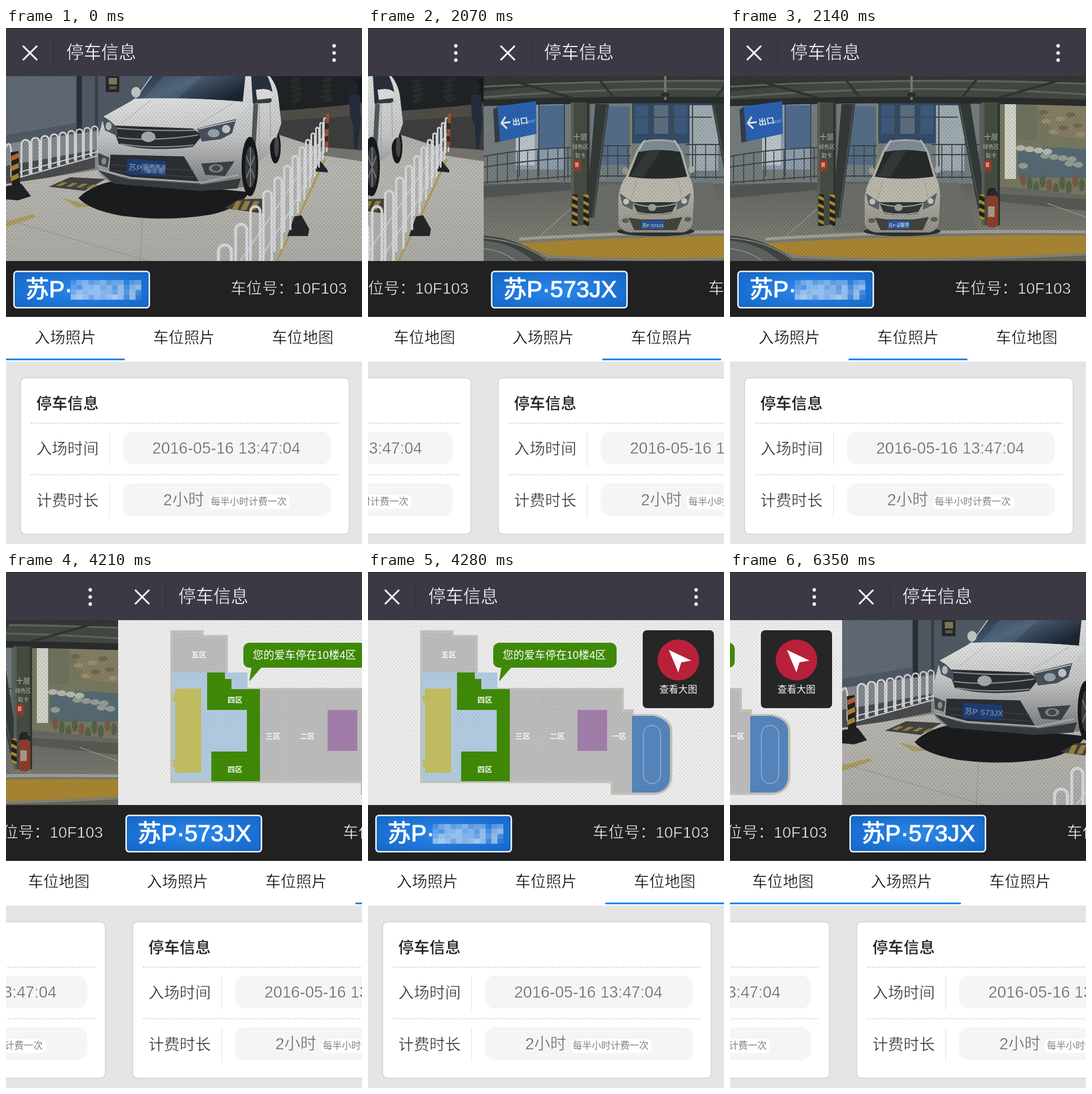
Write an HTML page that moves like this. It is 600x868 px and loops after 6.42 s.

```html
<!DOCTYPE html>
<html lang="zh-CN">
<head>
<meta charset="utf-8">
<title>停车信息</title>
<style>
html, body { margin: 0; width: 100%; height: 100%; overflow: hidden; background: #e5e5e5; }
svg { display: block; }
text { font-family: "Liberation Sans", "Noto Sans CJK SC", "Noto Sans CJK", sans-serif; font-weight: 300; white-space: pre; }
.sharp { opacity: 0; }
.soft { filter: blur(.6px); }
</style>
</head>
<body>
<svg id="stage" width="600" height="868" viewBox="0 0 600 868">
  <defs>
    <pattern id="mesh" width="6" height="7" patternUnits="userSpaceOnUse">
      <path d="M0 1.5h3.4l-1.7 2.4zM3 5h3.4l-1.7 2.4z" fill="#000"/>
    </pattern>
    <linearGradient id="road" x2="0" y2="1">
      <stop stop-color="#a3a4a2"/><stop offset=".5" stop-color="#b8b6b0"/><stop offset="1" stop-color="#acaaa4"/>
    </linearGradient>
    <linearGradient id="paint" x2="0" y2="1">
      <stop stop-color="#dfe1e0"/><stop offset=".55" stop-color="#c3c5c6"/><stop offset="1" stop-color="#747678"/>
    </linearGradient>
    <linearGradient id="hood" x2=".3" y2="1">
      <stop stop-color="#e2e3e1"/><stop offset="1" stop-color="#cccecd"/>
    </linearGradient>
    <linearGradient id="shell" x2="0" y2="1">
      <stop stop-color="#aaa99f"/><stop offset=".5" stop-color="#bab8ac"/><stop offset="1" stop-color="#918f86"/>
    </linearGradient>
    <linearGradient id="glass" x2="1" y2=".6">
      <stop stop-color="#243447"/><stop offset=".5" stop-color="#485c74"/><stop offset="1" stop-color="#1d2530"/>
    </linearGradient>
    <linearGradient id="floor" x2="0" y2="1">
      <stop stop-color="#62655f"/><stop offset="1" stop-color="#85857b"/>
    </linearGradient>
    <radialGradient id="badge" r=".75">
      <stop stop-color="#2b87ea"/><stop offset="1" stop-color="#1163c4"/>
    </radialGradient>
    <pattern id="hazard" width="12" height="12" patternUnits="userSpaceOnUse" patternTransform="rotate(25)">
      <path d="M0 0h12v12H0z" fill="#222"/><path d="M0 0h12v5H0z" fill="#a98c2e"/>
    </pattern>
  </defs>
  <g id="strip"></g>
</svg>
<script>
const rect = (x, y, w, h, fill, more = '') => `<rect x="${x}" y="${y}" width="${w}" height="${h}" fill="${fill}" ${more}/>`;
const shape = (d, fill, more = '') => `<path d="${d}" fill="${fill}" ${more}/>`;
const line = (d, color, width = 1, more = '') => `<path d="${d}" fill="none" stroke="${color}" stroke-width="${width}" ${more}/>`;
const oval = (x, y, rx, ry, fill, more = '') => `<ellipse cx="${x}" cy="${y}" rx="${rx}" ry="${ry}" fill="${fill}" ${more}/>`;
const text = (x, y, size, str, fill, more = '') => `<text x="${x}" y="${y}" font-size="${size}" fill="${fill}" ${more}>${str}</text>`;
// Lighter strokes: the ground colour trims the glyph edge
const thin = (x, y, size, str, fill, ground, more = '') => text(x, y, size, str, fill, `stroke="${ground}" stroke-width=".5" ${more}`);
const many = (n, fn) => Array.from({ length: n }, (_, i) => fn(i)).join('');
const mesh = alpha => rect(0, 81, 600, 311, 'url(#mesh)', `opacity="${alpha}"`);
const soft = parts => `<g class="soft">${parts}</g>`;
const arch = (x, w, top, base, width) =>
  line(`M${x} ${base}V${top + w / 2}a${w / 2} ${w / 2} 0 0 1 ${w} 0V${base - w * .4}`, '#d6d9dd', width);

const AREA = '苏P', NUMBER = '573JX';

// Blocks whose brightness follows digits 0-9
const mosaic = (x, y, w, h, rows) => rows.map((row, r) => many(row.length, c =>
  rect(x + c * w, y + r * h, w + .3, h + .3, '#dfe7f4', `opacity="${row[c] / 10}"`))).join('');

function entrance() {
  let s = rect(-5, 76, 610, 321, 'url(#road)');
  // wall, trees and shade
  s += shape('M0 76H250V190L0 240z', '#515a64') + shape('M0 76H118V160L0 180z', '#606a75');
  s += rect(119, 76, 9, 105, '#2b3036') + rect(150, 76, 5, 95, '#39404a');
  s += rect(168, 76, 23, 32, '#25282a') + rect(173, 84, 14, 11, '#7c795c') + rect(174, 98, 12, 5, '#5c5b4c');
  s += shape('M0 195L160 172V238L0 262z', '#85898b');
  s += shape('M0 232L150 205V236L70 252L0 262z', '#494b4d');
  s += shape('M430 76H605V208L530 202L455 178z', '#3e3e3f') + shape('M425 76H605V124L520 137L430 140z', '#202326');
  s += many(30, i => oval(440 + (i * 53) % 160, 85 + (i * 17) % 42, 7, 3, i % 3 ? '#292d2c' : '#181b1d'));
  s += shape('M455 140L600 128V147L460 156z', '#504d49') + shape('M530 200L605 206V225L525 213z', '#77756f');
  s += oval(587, 101, 7, 9, '#20252e') + shape('M578 112h18l2 44l-6 48h-5l-2-42l-5-12z', '#252d3c');
  // road marks
  s += shape('M0 326L45 313L50 318L0 335z', '#ad9c5c') + shape('M95 286L150 300L120 302z', '#a99c69');
  s += line('M0 322L240 392M230 320L226 392M40 275L0 290', '#93928c', 1);
  s += shape('M72 267L108 251L168 254L132 274z', '#45433f');
  s += many(4, i => shape(`M${84 + i * 17} ${265 + i * 1.3}l12-6l8 1l-12 6z`, '#8f7f4a'));
  // left railing
  let x = 26, w = 17;
  s += line('M20 243L158 207M20 252L158 214', '#c9ccd0', 2);
  for (let i = 0; i < 9; i++) {
    const u = (x - 26) / 130;
    s += arch(x, w * .82, 188 - 25 * u, 251 - 38 * u, 3.2 - u);
    x += w; w *= .96;
  }
  s += line('M0 200q7-14 9 10V250', '#d6d9dd', 3);
  s += shape('M0 266L26 262L42 283L20 290L0 288z', '#202123');
  s += shape('M8 209L21 207L24 264L10 266z', '#25201c') + many(3, i => shape(`M8 ${216 + i * 17}l13-6l1 8l-13 6z`, i ? '#a88438' : '#b3643a'));
  // car
  s += shape('M122 286Q145 262 195 255L410 276Q395 303 345 314Q270 326 195 316Q140 306 122 286z', '#1b1c1d');
  s += shape('M368 303L393 288L436 287L432 312z', '#45413a') + many(3, i => shape(`M${380 + i * 15} 306l8-15h9l-7 15z`, '#948042'));
  s += oval(454, 200, 9, 28, '#17191b') + oval(456, 199, 4, 18, '#45494d');
  s += shape('M248 76H440Q456 92 459 116L464 160L456 184Q446 184 442 212L424 226L400 268L330 271L182 261Q157 251 155 238L154 190L163 155L218 118z', 'url(#paint)');
  s += shape('M250 76H404L399 124Q310 116 218 120z', 'url(#glass)');
  s += shape('M270 76H335L290 118L232 119z', '#8396a7', 'opacity=".2"');
  s += shape('M218 119Q310 116 399 124L412 127L388 154Q330 163 312 169L185 163L164 149z', 'url(#hood)');
  s += line('M195 160L244 122M318 166L383 126', '#bfc1c1', 1.5);
  s += shape('M413 76H438Q449 96 450 116L444 126L416 127z', '#27313c') + shape('M417 127L425 128L421 197L414 186z', '#54585b');
  s += line('M427 124V208M445 120L446 183', '#a0a2a3', 1.2);
  s += shape('M421 104Q443 99 451 110L448 123L424 126z', '#dcdddd') + shape('M421 121L447 118L448 124L424 127z', '#393d40');
  s += oval(219, 108, 8, 9, '#c4c6c7');
  s += shape('M179 164L315 169L331 181L315 200Q240 209 190 195z', '#2a2d31');
  s += line('M181 168Q245 174 320 172M188 184Q245 192 324 180M193 195Q250 204 316 197', '#8d9295', 2);
  s += shape('M161 148Q175 153 187 168L188 182L167 172Z', '#4a535d') + oval(173, 165, 5, 7, '#b3bac0');
  s += shape('M322 169L388 153L381 177L362 187L330 191z', '#48515b') + oval(350, 177, 10, 7, '#98a2aa') + oval(371, 170, 7, 7, '#bfc6cb');
  s += line('M324 170L386 156', '#d6d9da', 1.5) + oval(240, 183, 12, 9, '#a6aaad');
  s += shape('M176 213L300 216L327 262L204 253L174 241z', '#2b2e32');
  s += line('M181 240L318 251M178 230L316 240', '#3f4348', 1.5);
  s += shape('M155 210L174 218L171 235L156 230z', '#44484b') + oval(165, 224, 4, 6, '#888e91');
  s += shape('M329 228L385 224L369 249L336 247z', '#3d4144') + oval(354, 236, 12, 7, '#7f868a') + oval(354, 236, 7, 5, '#42494e');
  s += shape('M155 239L205 254L332 263L396 253L390 270L326 274L182 262z', '#393c3f') + line('M158 238L210 252L330 260L392 247', '#a5a8a9', 3);
  s += oval(411, 233, 14, 50, '#17191a') + oval(412, 234, 9, 35, '#3b3e40') + oval(412, 234, 3, 7, '#222');
  s += line('M412 234V201M412 234V267M412 234L405 215M412 234L419 215M412 234L405 253M412 234L419 253', '#777a7c', 2);
  s += shape('M204 220L270 224L269 250L203 246z', '#1f3d72');
  s += '<g transform="rotate(3 205 240)">' + text(206, 239, 13.5, AREA, '#8fa3c2');
  s += text(233, 239, 13.5, NUMBER, '#8fa3c2', 'class="sharp"');
  s += '<g class="blur">' + mosaic(228, 227, 5, 5, ['23242413', '24323243', '12423132']) + '</g></g>';
  // right railing
  s += line('M456 392L490 324L538 220', '#b09a4c', 3);
  s += shape('M474 350L486 317L498 315L511 338L509 350z', '#242628') + shape('M519 241L530 224L542 239V243z', '#242628');
  s += line('M426 392L480 306L538 199M395 392L470 282L538 178', '#c6cace', 2.5);
  x = 358; w = 29;
  while (x < 540) {
    const top = 365 - (x - 358) * 1.2;
    s += arch(x, w * .75, top, top + 123 - (x - 455) * .8, 2 + w / 9);
    x += w; w = Math.max(6.5, w * .865);
  }
  s += shape('M539 145L545 143L543 200L537 202z', '#9a5230') + rect(538, 160, 6, 10, '#332b27') + rect(538, 182, 5, 9, '#332b27');
  return soft(s) + mesh(.15);
}

function pillar(x) {
  return rect(x, 125, 31, 207, '#454d43') + rect(x, 125, 5, 207, '#596157') + rect(x + 27, 125, 4, 207, '#30372f') +
    ['十层', '绿色区', '取卡'].map((str, i) => text(x + 16, 188 + i * 15, i ? 9 : 12, str, '#b6bbae', 'text-anchor="middle"')).join('') +
    rect(x + 4, 222, 13, 19, '#963a2e') + rect(x + 7, 226, 6, 8, '#bf9a83');
}

function bay() {
  let s = rect(-5, 76, 610, 321, '#5f6461');
  // building behind
  s += rect(0, 122, 150, 140, '#747c7e') + rect(54, 126, 81, 112, '#8e9dab') + rect(54, 175, 32, 56, '#b9c3c9') + rect(93, 130, 43, 72, '#4f6b8e');
  s += rect(180, 124, 240, 138, '#727d81') + rect(192, 132, 56, 98, '#566d86') + rect(250, 124, 134, 70, '#344c69');
  s += many(4, i => rect(255 + i * 32, 130, 24, 48, i % 2 ? '#5d6f7f' : '#3d5a7d')) + rect(347, 130, 48, 110, '#9fabb0');
  s += line('M250 150H384M278 124V190M320 124V190M352 124V252M60 126V250M93 126V250M136 125V258', '#404a51', 2);
  s += line('M248 115V260', '#8e8a5c', 3);
  // right wall painting
  s += rect(455, 123, 145, 167, '#77785f') + rect(463, 128, 19, 126, '#ced2c8') + rect(482, 128, 35, 60, '#6f735e');
  s += shape('M515 125H605V188L548 181z', '#857e64') + shape('M485 208Q530 195 605 205V252H485z', '#566a74');
  s += many(11, i => oval(490 + (i * 41) % 108, 202 + (i * 13) % 37, 8, 5, i % 3 ? '#959d95' : '#b5b9ac'));
  s += many(10, i => oval(494 + i * 11, 255 + (i * 7) % 18, 5, 11, i % 4 ? '#566149' : '#765c45'));
  s += many(8, i => oval(528 + (i * 29) % 70, 142 + (i * 11) % 40, 8, 4, i % 2 ? '#9a8f6b' : '#6f6853'));
  // floor
  s += shape('M-5 267Q300 244 605 282V397H-5z', 'url(#floor)') + shape('M186 264L385 260L418 342H175z', '#6b6e69');
  s += shape('M0 266Q100 258 150 260V272L0 286z', '#515654') + shape('M455 279L605 288V308L455 292z', '#575b53');
  s += line('M165 288L95 350M424 316L460 345M535 295L600 318', '#95948a', 1.5);
  s += line('M60 355Q300 339 605 343', '#a2a195', 5);
  s += shape('M50 363Q300 347 605 349V378Q300 394 110 382z', '#a98632') + shape('M110 387Q320 398 605 382V397H100z', '#69645d');
  // railings
  s += line('M0 216Q70 203 150 201M0 234Q70 223 150 218M0 260Q80 254 150 249M182 198H248M182 215H248M182 249H248M340 196H420M340 213H420M340 251H420', '#3d4549', 2);
  s += many(9, i => line(`M${6 + i * 17} ${214 - i * 1.6}V${262 - i}`, '#3d4549', 1.5));
  s += many(4, i => line(`M${192 + i * 17} 197V252M${357 + i * 17} 196V254`, '#3d4549', 1.5));
  // roof
  s += rect(-5, 76, 610, 44, '#444843') + shape('M-5 76H605V94Q300 74 -5 107z', '#333734');
  s += line('M-5 117Q300 91 605 112M-5 99Q300 82 605 94', '#62675f', 3) + line('M-5 126Q300 116 605 126', '#292d2b', 11);
  s += line('M20 81L150 118M580 81L450 118M190 81L220 118M420 81L390 118', '#313532', 4) + line('M306 76V121', '#777c72', 4) + oval(306, 112, 8, 4, '#2b302e');
  s += shape('M188 128H211L186 319H172z', '#343a38') + shape('M384 127H405L433 304H418z', '#343a38');
  s += line('M208 130L184 318M387 130L421 302', '#565d59', 1.5);
  s += pillar(147) + pillar(424);
  s += rect(149, 280, 9, 53, 'url(#hazard)') + rect(168, 280, 9, 53, 'url(#hazard)') + rect(420, 280, 9, 42, 'url(#hazard)');
  s += line('M435 283Q432 269 444 273Q454 279 448 290', '#222625', 3) + rect(433, 282, 19, 53, '#8f3c2c', 'rx="6"') + rect(435, 300, 11, 18, '#a69b88') + rect(436, 269, 11, 13, '#272926');
  // sign
  s += shape('M16 137L24 132L28 191L19 193z', '#343d48') + shape('M23 132L88 123L89 178L28 191z', '#2b62b0');
  s += '<g transform="rotate(-8 32 160)">' + line('M45 160H31M38 150L30 160L38 170', '#e3e9f0', 3) + text(48, 166, 13.5, '出口', '#e3e9f0', 'style="font-weight:700"') + text(74, 166, 6, 'EXIT', '#d0dbe7') + '</g>';
  // parked car
  s += oval(290, 342, 65, 8, '#2d302e');
  s += shape('M268 190Q295 184 324 190L335 208L346 248Q355 264 354 288L352 328Q349 342 335 344H247Q230 342 227 329L227 285Q229 264 240 249L258 205z', 'url(#shell)');
  s += shape('M268 193Q295 187 324 193L331 207Q295 202 261 207z', '#7f8c98') + line('M272 188L262 205M321 188L332 207', '#c8cac3', 1.5);
  s += shape('M261 208Q295 202 331 208L343 250Q292 257 244 250z', '#262c2b') + shape('M276 207L298 206L270 250L247 249z', '#3c4341', 'opacity=".6"');
  s += shape('M242 252Q292 260 344 252L350 279L327 294H250L230 280z', '#bbb8ac') + line('M258 257L248 288M328 257L334 287', '#a3a197', 1.2);
  s += oval(239, 240, 5, 6, '#989b94') + oval(350, 238, 5, 6, '#abaca4');
  s += shape('M229 278L252 293L251 306L234 298z', '#5c6364') + shape('M349 277L326 293L325 306L344 297z', '#5c6364');
  s += oval(240, 292, 5, 5, '#c3c6c1') + oval(338, 291, 5, 5, '#c3c6c1');
  s += shape('M251 293H326L316 312Q288 317 260 312z', '#343837') + line('M252 295Q288 306 325 295M259 310Q288 317 317 310', '#b0b3ae', 1.8) + oval(284, 302, 7, 6, '#9da09b');
  s += shape('M244 319L264 322H309L335 318L325 340H254z', '#42443f') + oval(239, 324, 6, 4, '#5c5f5e') + oval(344, 322, 6, 4, '#5c5f5e');
  s += rect(266, 324, 37, 14, '#285596') + text(267, 334.5, 7.5, AREA, '#dce6ef');
  s += `<g class="sharp">${text(280, 334.5, 7.5, '·' + NUMBER, '#dce6ef')}</g><g class="blur">${mosaic(281, 327, 4, 4, ['24536', '53624'])}</g>`;
  // nearby hood
  s += shape('M-5 349Q60 351 119 397H-5z', '#3f4443') + shape('M-5 358Q50 359 89 397H-5z', '#5f6461') + line('M-5 353Q62 356 109 392M-5 371Q30 373 54 392', '#8f948e', 1.5);
  return soft(s) + mesh(.15);
}

function map() {
  const label = (x, y, str) => text(x, y + 4.5, 12.5, str, '#f7f7f7', 'text-anchor="middle" style="font-weight:700"');
  let s = rect(0, 81, 600, 311, '#ececec');
  s += shape('M90 100H142V108H183V179H191V197H429V233H446V241H482Q511 247 511 268V346Q509 370 482 373H411V353H90z', '#bcbcbc', 'stroke="#c5c4b9" stroke-width="4"');
  s += rect(91, 169, 127, 182, '#b1cbe0');
  s += shape('M96 196H140V338H96V328H92V316H96V219H92V207H96z', '#c2be62');
  s += shape('M150 169H180V180H191V197H239V352H157V302H217V232H150z', '#408a08');
  s += rect(353, 232, 50, 69, '#a27eaa') + line('M284 199V351', '#c3c3c3', 1);
  s += shape('M445 242H481Q509 248 509 268V346Q507 367 486 371H445z', '#5585bd');
  s += rect(464, 258, 29, 98, 'none', 'rx="14.5" stroke="#b8cade"');
  s += mesh(.09);
  s += label(136, 139, '五区') + label(197, 215, '四区') + label(197, 332, '四区') + label(261, 276, '三区') + label(319, 276, '二区') + label(423, 276, '一区');
  s += rect(211, 119, 208, 42, '#3f8908', 'rx="10"') + shape('M225 159L221 184L242 160z', '#3f8908');
  s += text(227, 146, 18, '您的爱车停在10楼4区', '#fff');
  s += rect(463, 98, 120, 131, '#262626', 'rx="7"') + oval(523, 148, 35, 34.5, '#b9203a');
  s += shape('M507 131L545 149L528 152L523 169z', '#fff') + text(491, 203, 16, '查看大图', '#f3f3f3');
  return s;
}

function screen(picture, tab, x) {
  const head = '#3b3a44', bar = '#212121', pill = '#f5f5f5';
  let s = rect(0, 0, 600, 868, '#e5e5e5') + rect(0, 0, 600, 81, head) + rect(0, 0, 600, 1, '#202024');
  s += line('M28.5 30L52.5 54M52.5 30L28.5 54', '#fff', 3) + line('M80.5 21V61', '#302f37', 1.5);
  s += thin(101.5, 51, 29.5, '停车信息', '#fff', head) + [30, 42, 54].map(y => oval(553, y, 2.9, 2.9, '#fff')).join('');
  s += `<svg x="0" y="81" width="600" height="311" viewBox="0 81 600 311">${picture}</svg>`;
  // plate bar
  s += rect(0, 392, 600, 94, bar) + rect(13.5, 409.5, 228, 61, 'url(#badge)', 'rx="5" stroke="#e8f3ff" stroke-width="2.6"');
  s += rect(15.5, 411.5, 224, 57, 'none', 'rx="4" stroke="#0d58b5" stroke-width="1"');
  const bold = 'stroke="#fff" stroke-width="1.1"';
  s += text(33, 453, 39.5, AREA + '·', '#fff', bold) + `<g class="sharp">${text(112, 453, 39.5, NUMBER, '#fff', bold)}</g>`;
  s += `<g class="blur">${mosaic(109, 424, 9.9, 8.2, ['245345344134', '325564536256', '465665546362', '676465676261'])}</g>`;
  s += thin(378.5, 447, 26.5, '车位号：10F103', '#f0f0f0', bar);
  // tabs
  s += rect(0, 486, 600, 75, '#fff') + rect(tab * 200, 556, 200, 3, '#1e87ea');
  s += ['入场照片', '车位照片', '车位地图'].map((str, i) => thin(48 + i * 200, 530, 26, str, '#000', '#fff')).join('');
  // card
  s += rect(24.5, 588.5, 554, 263, '#fff', 'rx="8" stroke="#d2d2d2" stroke-width="1.5"');
  s += thin(51, 640.5, 26.3, '停车信息', '#222', '#fff', 'style="font-weight:700"');
  s += line('M42 664.8H562M42 751.5H562', '#c8c8c8', 1.6, 'stroke-dasharray="2 2"') + line('M174.5 679V737M174.5 766V824', '#e4e4e4', 1.2);
  s += thin(51, 717, 26.3, '入场时间', '#2b2b2b', '#fff') + thin(51, 804, 26.3, '计费时长', '#2b2b2b', '#fff');
  s += rect(197, 679, 351, 55, pill, 'rx="17"') + rect(197, 766, 351, 55, pill, 'rx="17"');
  s += thin(246.5, 715.5, 26.9, '2016-05-16 13:47:04', '#666', pill) + thin(265, 802.5, 27, '2小时', '#666', pill);
  s += rect(342, 786, 136, 23, '#fff', 'rx="7"') + text(345, 802, 16, '每半小时计费一次', '#808080');
  return `<svg x="${x}" y="0" width="600" height="868">${s}</svg>`;
}

const strip = document.getElementById('strip');
strip.innerHTML = [entrance, bay, map, entrance].map((draw, i) => screen(draw(), i % 3, i * 600)).join('');

// [time in ms, strip offset]
const LOOP = 6420;
const steps = [[0, 0], [2000, 144], [2070, 405], [2140, 600], [4140, 750], [4210, 1011], [4280, 1200], [6280, 1350], [6350, 1611], [LOOP, 1800]];
const start = document.timeline.currentTime || 0;
const still = x => x % 600 === 0;

function play(el, look) {
  const frames = steps.map(([time, x]) => ({ offset: time / LOOP, easing: 'steps(1, end)', ...look(x) }));
  el.animate(frames, { duration: LOOP, iterations: Infinity }).startTime = start;
}
play(strip, x => ({ transform: `translateX(${-x}px)` }));
document.querySelectorAll('.sharp').forEach(el => play(el, x => ({ opacity: still(x) ? 0 : 1 })));
document.querySelectorAll('.blur').forEach(el => play(el, x => ({ opacity: still(x) ? 1 : 0 })));
</script>
</body>
</html>
```
